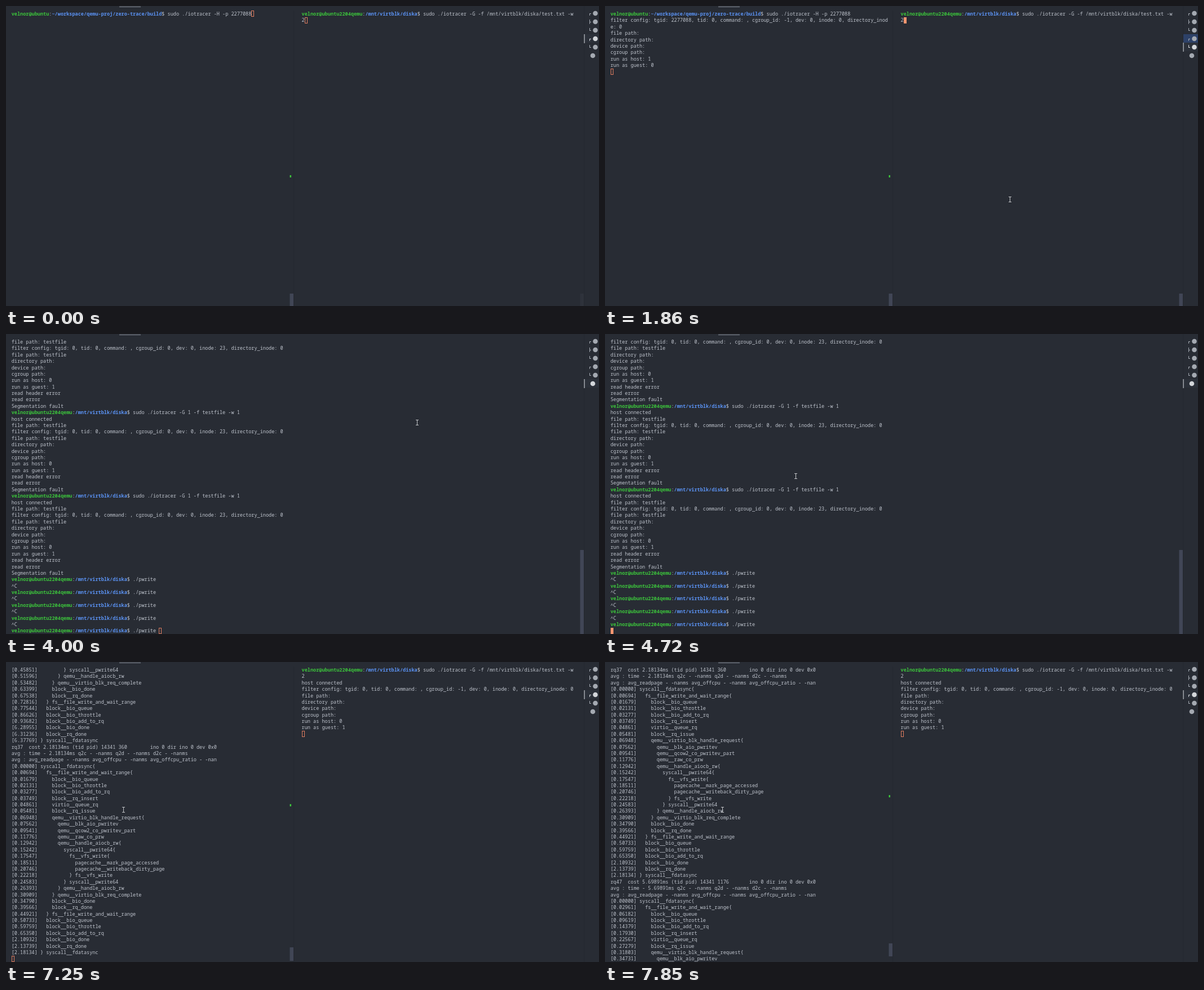
An HTML page with a canvas that plays this animation: 1052x532 px, repeating every 8 s.

```html
<!DOCTYPE html>
<html lang="en">
<head>
<meta charset="utf-8">
<title>Terminal session</title>
<style>
  html, body { margin: 0; width: 100%; height: 100%; overflow: hidden; background: #282c34; }
  canvas { display: block; width: 1052px; height: 532px; }
</style>
</head>
<body>
<canvas id="stage" width="1052" height="532"></canvas>
<script>
const ctx = document.getElementById('stage').getContext('2d');
const LOOP = 8000, LEAD = 8;
const CELL = 5.128, LINE = 11.386, TOP = 8.3, ROWS = 46;
const LEFT = 9.7, RIGHT = 524.6;
const FONT = '8.547px "Noto Sans Mono", "DejaVu Sans Mono", monospace';
const C = {
  bg: '#282c34', text: '#bfc4cd', green: '#3cc43c', blue: '#5b93f5',
  caret: '#f8956f', hollow: '#df7d60', thumb: '#414656', faint: '#2e323b', edge: '#24282f',
  active: '#2c313a', picked: '#2d4168', dim: '#a4a9b1', bright: '#d3d6da'
};
// Moments when the session changes, in ms
const T = {
  focusHost: 530, runHost: 800, hostOutput: 1060, focusGuest: 1860, leaveHost: 2260,
  runGuest: 2530, connected: 2660, guestOutput: 2860, openWriter: 3660, focusWriter: 4200,
  runWriter: 4720, closeWriter: 5720, enterHost: 6390, nudge: 7250, wheel: 7580
};

// ---- terminal content ----
const prompt = (host, path, cmd) => [
  ['velnor@' + host, C.green, true], [':'], [path, C.blue, true], ['$ ' + cmd]
];
const guest = cmd => prompt('ubuntu2204qemu', '/mnt/virtblk/diska', cmd);
const paths = (file, host) => [
  'file path:' + file, 'directory path:', 'device path:', 'cgroup path:',
  'run as host: ' + host, 'run as guest: ' + (1 - host)
];
const config = (tgid, cgroup, inode) =>
  `filter config: tgid: ${tgid}, tid: 0, command: , cgroup_id: ${cgroup}, dev: 0, inode: ${inode}, directory_inode: 0`;

const hostCmd = prompt('ubuntu', '~/workspace/qemu-proj/zero-trace/build', 'sudo ./iotracer -H -p 2277088');
const hostConfig = config(2277088, -1, 0);
const hostLog = [hostCmd, hostConfig.slice(0, 96), hostConfig.slice(96), ...paths('', 1)];

const guestCmd = [guest('sudo ./iotracer -G -f /mnt/virtblk/diska/test.txt -w'), '2'];
const guestLog = [...guestCmd, 'host connected', config(0, -1, 0), ...paths('', 0)];

const crash = ['host connected', 'file path: testfile', config(0, 0, 23), ...paths(' testfile', 0),
  'read header error', 'read error', 'Segmentation fault'];
const crashCmd = guest('sudo ./iotracer -G 1 -f testfile -w 1');
const write = guest('./pwrite');
const writeLog = [...crash.slice(1), crashCmd, ...crash, crashCmd, ...crash];
for (let i = 0; i < 4; i++) writeLog.push(write, '^C');
writeLog.push(write);

// One group per phase of a request
const bio = ['block__bio_queue', 'block__bio_throttle', 'block__bio_add_to_rq'];
const phases = [
  ['fs__file_write_and_wait_range{', ...bio, 'block__rq_insert', 'virtio__queue_rq',
    'block__rq_issue', 'qemu__virtio_blk_handle_request{'],
  ['qemu__blk_aio_pwritev', 'qemu__qcow2_co_pwritev_part', 'qemu__raw_co_prw',
    'qemu__handle_aiocb_rw{', 'syscall__pwrite64{', 'fs__vfs_write{',
    'pagecache__mark_page_accessed', 'pagecache__writeback_dirty_page',
    '} fs__vfs_write', '} syscall__pwrite64', '} qemu__handle_aiocb_rw'],
  ['} qemu__virtio_blk_req_complete', 'block__bio_done', 'block__rq_done',
    '} fs__file_write_and_wait_range', ...bio],
  ['block__bio_done'],
  ['block__rq_done', '} syscall__fdatasync']
];

function random(seed) {
  return () => (seed = seed * 16807 % 2147483647) / 2147483647;
}

// Each phase ends at a known time; its calls are spread up to there with some jitter.
function record(rq, pid, ends) {
  const rnd = random(rq * 991), cost = ends[4].toFixed(5) + 'ms';
  const nan = k => ` ${k} - -nanms`;
  const lines = [];
  let depth = 0;
  const add = (time, name) => {
    if (name[0] === '}') depth--;
    lines.push(`[${time.toFixed(5)}] ${'  '.repeat(depth)}${name}`);
    if (name.endsWith('{')) depth++;
  };
  add(0, 'syscall__fdatasync{');
  phases.forEach((calls, p) => {
    const from = p ? ends[p - 1] : 0, span = (ends[p] - from) / calls.length;
    calls.forEach((name, i) => {
      const jitter = i < calls.length - 1 ? rnd() * .7 : 0;
      add(from + span * (i + 1 - jitter), name);
    });
  });
  return [
    `rq${rq}  cost ${cost} (tid pid) 14341 ${pid}`.padEnd(48) + 'ino 0 dir ino 0 dev 0x0',
    `avg : time - ${cost}${nan('q2c')}${nan('q2d')}${nan('d2c')}`,
    `avg :${nan('avg_readpage')}${nan('avg_offcpu')} avg_offcpu_ratio - -nan`,
    ...lines
  ];
}
const usual = [.06948, .26393, .65350, 2.10932, 2.18134];
const records = [
  record(17, 360, usual.map(v => v * 1.37)),
  record(27, 360, [.13548, .51596, .93682, 6.28955, 6.37769]),
  record(37, 360, usual),
  record(47, 1176, [.31803, .80412, 1.70729, 5.51074, 5.69891])
];
const arrivals = [6060, T.enterHost, 6790, T.wheel];

// ---- drawing helpers ----
function box(x, y, w, h, color) {
  ctx.fillStyle = color;
  ctx.fillRect(x, y, w, h);
}
const thumb = (x, y, h, color = C.thumb) => box(x, y, 6.5, h, color);

function drawLine(line, x, row) {
  const runs = typeof line === 'string' ? [[line]] : line;
  const y = TOP + row * LINE + 8.7;
  let col = 0;
  for (const [text, color = C.text, bold] of runs) {
    ctx.font = (bold ? 'bold ' : '') + FONT;
    ctx.fillStyle = color;
    for (const ch of text) {
      if (ch !== ' ') ctx.fillText(ch, x + col * CELL, y);
      col++;
    }
  }
}
const drawText = (lines, x) => lines.forEach((line, row) => drawLine(line, x, row));

function caret(x, col, row, filled) {
  const cx = Math.round(x + col * CELL), cy = Math.round(TOP + row * LINE);
  if (filled) return box(cx, cy, 5, 11, C.caret);
  ctx.strokeStyle = C.hollow;
  ctx.lineWidth = 1;
  ctx.strokeRect(cx + .5, cy + .5, 4, 10);
}

// ---- parts ----
function hostPane(t) {
  const count = arrivals.filter(a => t >= a).length;
  if (t < T.hostOutput) {
    drawText([hostCmd], LEFT);
    if (t < T.runHost) caret(LEFT, 83, 0, t >= T.focusHost);
    else caret(LEFT, 0, 1, true);
  } else {
    const log = hostLog.concat(...records.slice(0, count));
    const wheel = t < T.wheel ? 0 : Math.min(21, 6 * Math.floor((t - T.wheel) / 67));
    const first = Math.max(0, log.length + 1 - ROWS) - wheel;
    drawText(log.slice(first, first + ROWS), LEFT);
    if (!wheel) caret(LEFT, 0, log.length - first, t < T.focusGuest);
    if (t >= T.wheel) thumb(503.5, 509 - wheel * 10 / 21, 23);
  }
  if (t < T.leaveHost || (t >= T.enterHost && t < T.nudge)) thumb(503.5, 510, 22);
  else if (t >= T.nudge && t < T.wheel) thumb(503.5, 506, 24);
  box(503.5, 300 - count * 16, 2.5, 4, C.green);
}

function guestPane(t) {
  const rows = t < T.connected ? 2 : t < T.guestOutput ? 3 : guestLog.length;
  drawText(guestLog.slice(0, rows), RIGHT);
  if (t < T.runGuest) caret(RIGHT, 1, 1, t >= T.focusGuest);
  else caret(RIGHT, 0, rows, t < T.openWriter);
  if (t < 600) thumb(1018.5, 510, 22, C.faint);
  else if (t >= 1400 && t < T.openWriter) thumb(1018.5, 510, 22);
}

function writerPane(t) {
  const entered = t >= T.runWriter;
  drawText(entered ? writeLog.slice(1) : writeLog, LEFT);
  caret(LEFT, entered ? 0 : 51, 45, t >= T.focusWriter);
  if (t >= 3860) thumb(1018.5, 383, 149);
}

// Branch sign in front of a tab: stem up, stem down or both
function branch(y, up, down, color) {
  box(1035, y - (up ? 4 : 0), 1, (up ? 4 : 0) + (down ? 4 : 1), color);
  box(1035, y, 3, 1, color);
}

function sidebar(t) {
  const active = t < T.focusGuest ? 3 : t < T.openWriter ? 4 : t < T.closeWriter ? 5 : 3;
  box(1025, 0, 1, 532, C.edge);
  for (let i = 0; i < 6; i++) {
    const y = 13 + i * 15, on = i === active, color = on ? C.bright : C.dim;
    if (on) {
      box(1026, y - 8, 26, 15, C.active);
      box(1025.5, y - 8, 1.2, 16, '#c3c7ce');
    } else if (active === 4 && i === 3) box(1026, y - 8, 26, 15, C.picked);
    const opens = i === 0 || i === 3;
    if (i < 5) branch(y, !opens, opens || i === 1, color);
    ctx.beginPath();
    ctx.arc(i === 5 ? 1041 : 1045.5, y, 4.3, 0, Math.PI * 2);
    ctx.fillStyle = color;
    ctx.fill();
  }
}

// Pointer moves: start, end, and where it arrives
const moves = [
  [130, 530, 242, 300], [900, 1800, 718, 343], [3130, 3460, 1044, 81],
  [3740, 4320, 338, 252], [4780, 5700, 1037, 62], [6000, 6850, 208, 262]
];

function pointer(t) {
  if (t < 130 || (t >= T.runGuest && t < 3130)) return;
  let x = 1010, y = 110;
  for (const [from, to, tx, ty] of moves) {
    const u = Math.min(1, Math.max(0, (t - from) / (to - from))), e = u * u * (3 - 2 * u);
    x += (tx - x) * e;
    y += (ty - y) * e;
  }
  ctx.save();
  ctx.translate(Math.round(x), Math.round(y));
  if (x > 1026) hand();
  else beam();
  ctx.restore();
}

function hand() {
  ctx.fillStyle = '#f4f4f4';
  ctx.fill(new Path2D('M-2-6H0V-2L4.5-1V3L3 6.5H-2L-5 2L-4.5 0L-2 1.5Z'));
  for (const x of [1.2, 2.8]) box(x, -1.5, .5, 2.5, '#555');
}

function beam() {
  const color = '#c4c6c9';
  box(0, -5, 1, 10, color);
  for (const y of [-5, 4]) {
    box(-2, y, 2, 1, color);
    box(1, y, 2, 1, color);
  }
}

function draw(t) {
  box(0, 0, 1052, 532, C.bg);
  box(201, 1, 38, 1, '#858b96');
  if (t >= T.openWriter && t < T.closeWriter) writerPane(t);
  else {
    box(510, 8, 1, 524, C.edge);
    hostPane(t);
    guestPane(t);
  }
  sidebar(t);
  pointer(t);
}

const start = performance.now();
function loop(now) {
  const t = Math.max(0, now - start) % LOOP;
  draw(Math.min(t + LEAD, LOOP));
  requestAnimationFrame(loop);
}
draw(0);
requestAnimationFrame(loop);
</script>
</body>
</html>
```
